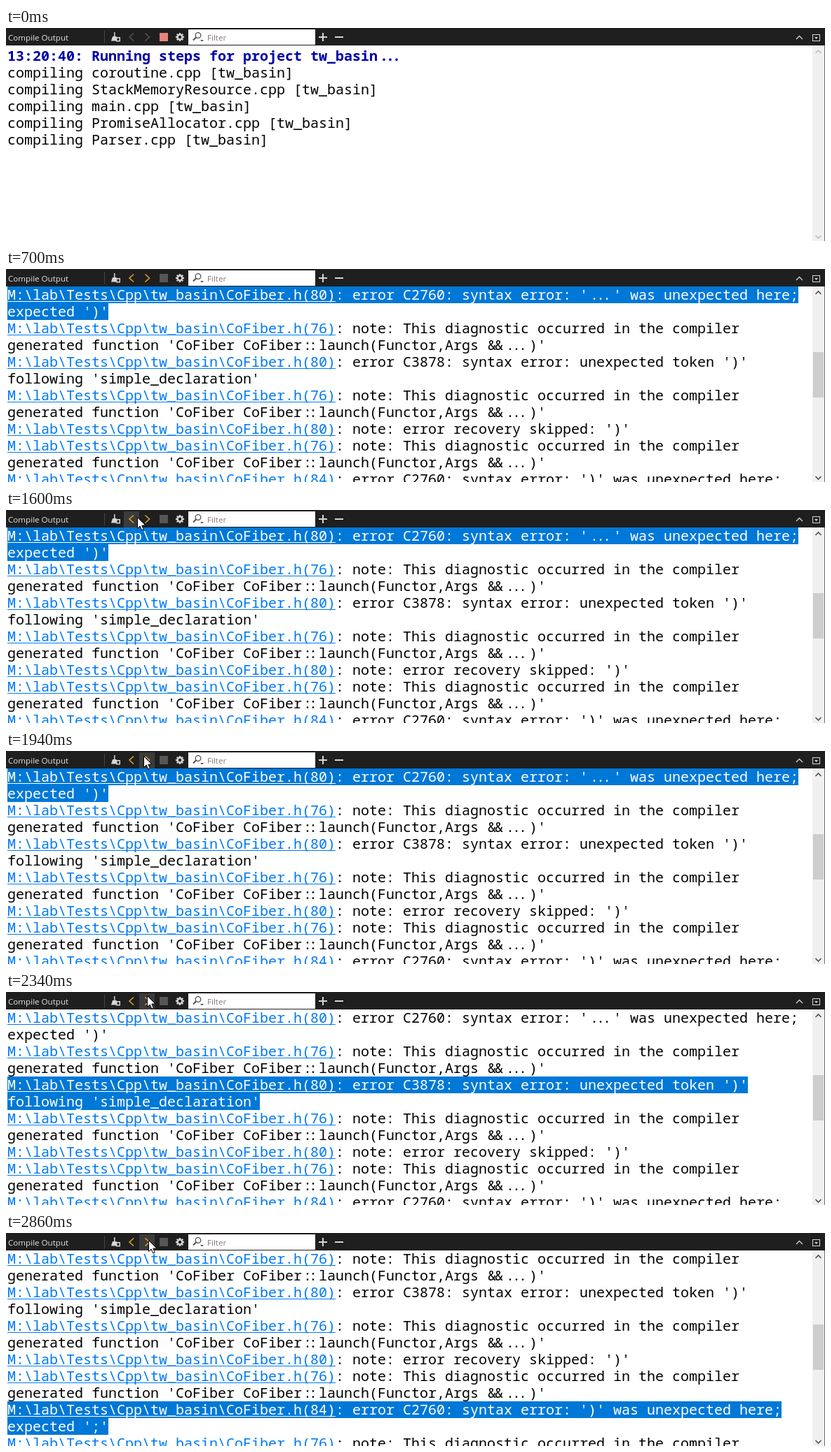
An HTML page with a canvas for the animation above (3.36 s loop, 1168x305 px).

```html
<!DOCTYPE html>
<html lang="en">
<head>
<meta charset="utf-8">
<title>Compile Output</title>
<style>
html, body { margin: 0; width: 100%; height: 100%; overflow: hidden; background: #fff; }
canvas { display: block; width: 1168px; height: 305px; }
</style>
</head>
<body>
<canvas id="stage" width="1168" height="305"></canvas>
<script>
const ctx = document.getElementById('stage').getContext('2d', { alpha: false });
const LOOP = 3360, CELL = 12, ROW = 24, LEFT = 2, TOP = 25;
const MONO = '20px "Noto Sans Mono", "DejaVu Sans Mono", monospace';
const UI = '11.6px "Open Sans", "Noto Sans", sans-serif';
const BAR = '#1f1f1f', ICON = '#d6d6d6', OFF = '#565656', GOLD = '#e3a534';
const PROJECT = 'tw_basin';

const link = n => `M:\\lab\\Tests\\Cpp\\${PROJECT}\\CoFiber.h(${n})`;
const LINK_LEN = link(76).length;
const note = () => [
  link(76) + ': note: This diagnostic occurred in the compiler',
  "generated function 'CoFiber CoFiber::launch(Functor,Args &&...)'"
];
const report = (n, found, wanted, kind) => [
  `${link(n)}: error C2760: syntax error: '${found}' was unexpected here;`,
  `expected '${wanted}'`,
  ...note(),
  `${link(n)}: error C3878: syntax error: unexpected token ')'`,
  `following '${kind}'`,
  ...note(),
  `${link(n)}: note: error recovery skipped: ')'`,
  ...note()
];
const errors = [
  ...report(80, '...', ')', 'simple_declaration'),
  ...report(84, ')', ';', 'expression_statement')
];
const files = ['coroutine', 'StackMemoryResource', 'main', 'PromiseAllocator', 'Parser'];

// Pointer stops: time, tip x, tip y
const stops = [
  [1200, 248, 18], [1267, 222, 20], [1333, 198, 18], [1400, 169, 15],
  [1540, 178, 12], [1600, 187, 10],
  [1800, 189, 9], [1870, 192, 8], [1940, 196, 7], [2010, 199, 6], [2080, 201, 5],
  [2590, 201, 6], [2660, 202, 8], [2720, 203, 10]
];

function rect(x, y, w, h, color) {
  ctx.fillStyle = color;
  ctx.fillRect(x, y, w, h);
}

function poly(points, color) {
  ctx.beginPath();
  points.forEach(([x, y]) => ctx.lineTo(x, y));
  ctx.closePath();
  ctx.fillStyle = color;
  ctx.fill();
}

function stroke(points, color, width) {
  ctx.beginPath();
  points.forEach(([x, y]) => ctx.lineTo(x, y));
  ctx.strokeStyle = color;
  ctx.lineWidth = width;
  ctx.stroke();
}

function disc(x, y, r, color) {
  ctx.beginPath();
  ctx.arc(x, y, r, 0, Math.PI * 2);
  ctx.fillStyle = color;
  ctx.fill();
}

// Monospaced text whose joined signs sit closer together
function mono(text, x, base, color, bold) {
  ctx.font = (bold ? '700 ' : '') + MONO;
  ctx.fillStyle = color;
  for (const part of text.split(/(\.{3}|::|&&)/)) {
    const pull = { '...': 3, '::': 4, '&&': 2 }[part];
    if (pull) {
      const mid = (part.length - 1) / 2;
      [...part].forEach((c, i) => ctx.fillText(c, x + i * CELL - (i - mid) * pull, base));
    } else {
      ctx.fillText(part, x, base);
    }
    x += part.length * CELL;
  }
}

function drawStart() {
  mono(`13:20:40: Running steps for project ${PROJECT}...`, LEFT, 47, '#0000aa', true);
  files.forEach((f, i) =>
    mono(`compiling ${f}.cpp [${PROJECT}]`, LEFT, 47 + (i + 1) * ROW, '#000'));
}

function drawErrors(first, rows, picked) {
  errors.slice(first, first + rows).forEach((line, i) => {
    const y = TOP + i * ROW, base = y + 18.5;
    const on = picked >= 0 && (first + i === picked || first + i === picked + 1);
    const ink = on ? '#fff' : '#000';
    if (on) rect(LEFT, y, line.length * CELL, ROW, '#0078d7');
    if (line.startsWith('M:')) {
      const blue = on ? '#fff' : '#007af4', w = LINK_LEN * CELL;
      mono(line.slice(0, LINK_LEN), LEFT, base, blue);
      rect(LEFT, y + 21, w, 1, blue);
      mono(line.slice(LINK_LEN), LEFT + w, base, ink);
    } else {
      mono(line, LEFT, base, ink);
    }
  });
}

function drawScroll(thumb) {
  rect(1150, TOP, 17, 280, '#f0f0f0');
  const color = thumb ? '#505050' : '#bfbfbf';
  stroke([[1154.5, 36], [1158.5, 32], [1162.5, 36]], color, 1.6);
  stroke([[1154.5, 297], [1158.5, 301], [1162.5, 297]], color, 1.6);
  if (thumb) rect(1151, thumb[0], 15, thumb[1], '#cdcdcd');
  rect(1167, TOP, 1, 280, '#707070');
}

function chevron(x, dir, color) {
  stroke([[x - 3 * dir, 7.5], [x + 3 * dir, 13], [x - 3 * dir, 18.5]], color, 1.5);
}

function drawGear(x, y) {
  ctx.save();
  ctx.translate(x, y);
  for (let i = 0; i < 8; i++) {
    rect(-1.2, -6, 2.4, 3, ICON);
    ctx.rotate(Math.PI / 4);
  }
  ctx.restore();
  disc(x, y, 4.4, ICON);
  disc(x, y, 2.2, BAR);
}

function drawField(hot) {
  rect(260, 2, 181, 22, '#fff');
  if (hot) {
    ctx.strokeStyle = 'rgba(60,60,60,.2)';
    ctx.lineWidth = 2;
    ctx.strokeRect(261, 3, 179, 20);
  }
  ctx.beginPath();
  ctx.arc(274, 10.5, 3.8, 0, Math.PI * 2);
  ctx.strokeStyle = '#505050';
  ctx.lineWidth = 1.3;
  ctx.stroke();
  stroke([[271.2, 13.2], [267, 17.5]], '#505050', 2);
  poly([[277, 17], [282, 17], [279.5, 19.5]], '#505050');
  ctx.font = UI;
  ctx.fillStyle = '#857878';
  ctx.fillText('Filter', 287, 18);
}

function drawBar(t, hover) {
  rect(0, 0, 1168, TOP, BAR);
  ctx.font = UI;
  ctx.fillStyle = '#e4e4e4';
  ctx.fillText('Compile Output', 3, 18);
  rect(140, 4, 1, 18, '#454545');
  if (hover) rect(hover < 0 ? 168 : 190, 2, 22, 23, '#3b3b3b');

  // broom and box
  rect(154, 6, 1.5, 6, ICON);
  poly([[152, 12], [157.5, 12], [159, 18.5], [150, 18.5]], ICON);
  rect(157, 13, 6, 6.5, ICON);
  rect(158.5, 14.5, 3, 3.5, BAR);

  const nav = t < 350 ? OFF : GOLD;
  chevron(179, -1, nav);
  chevron(201.5, 1, nav);
  rect(219, 7, 12, 12, t < 700 ? '#e8837b' : OFF);
  drawGear(248, 13);
  drawField(t >= 950 && t < 1200);

  rect(446, 12, 12, 2, ICON);
  rect(451, 7, 2, 12, ICON);
  rect(469, 12, 12, 2, ICON);
  stroke([[1127, 16], [1131.5, 11.5], [1136, 16]], ICON, 1.3);
  ctx.lineWidth = 1;
  ctx.strokeStyle = ICON;
  ctx.strokeRect(1150.5, 9.5, 10, 9);
  poly([[1153, 13], [1158, 13], [1155.5, 16]], ICON);
}

function drawPointer(x, y) {
  const shape = [[0, 0], [0, 16], [3.7, 12.6], [6.3, 18.5], [8.8, 17.4], [6.3, 11.7], [11.4, 11.4]];
  const points = shape.map(([dx, dy]) => [x + dx + 0.5, y + dy + 0.5]);
  poly(points, '#fff');
  stroke([...points, points[0]], '#000', 1);
}

function drawCaretPointer(x, y) {
  rect(x, y - 7, 1, 15, '#000');
  rect(x - 3, y - 8, 7, 1, '#000');
  rect(x - 3, y + 8, 7, 1, '#000');
}

function draw(t) {
  rect(0, 0, 1168, 305, '#fff');
  if (t < 350) {
    drawStart();
    drawScroll();
  } else if (t < 700) {
    drawErrors(11, 11, -1);
    drawScroll([213, 78]);
  } else if (t < 2860) {
    drawErrors(0, 12, t < 2340 ? 0 : 4);
    drawScroll([119, 65]);
  } else {
    drawErrors(2, 12, 11);
    drawScroll([131, 65]);
  }

  const spot = stops.filter(s => s[0] <= t).pop();
  const [, x, y] = spot || [];
  const inNav = spot && x >= 168 && x < 212;
  drawBar(t, inNav ? (x < 190 ? -1 : 1) : 0);
  if (t >= 950 && t < 1200) drawCaretPointer(330, 12);
  if (spot) {
    const click = (t >= 2270 && t < 2340) || (t >= 2790 && t < 2860);
    if (click) disc(x + 0.5, y + 0.5, 12, 'rgba(255,232,30,.68)');
    drawPointer(x, y);
  }
}

const begin = performance.now();
function tick() {
  draw((performance.now() - begin) % LOOP);
  requestAnimationFrame(tick);
}
tick();
</script>
</body>
</html>
```
